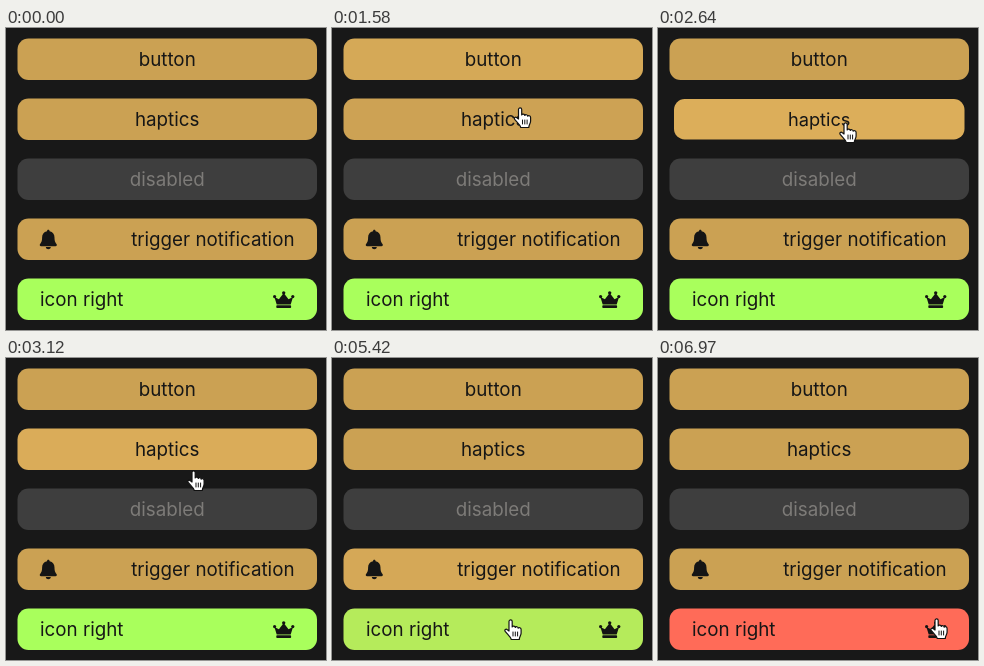
Recreate the animation shown at these times as an HTML page. Size 320 px wide and 302 px high, loop 7000 ms.

```html
<!DOCTYPE html>
<html lang="en">
<head>
<meta charset="utf-8">
<style>
  html, body { margin: 0; width: 100%; height: 100%; overflow: hidden; background: #181818; }
  svg { display: block; width: 320px; height: 302px; }
  text { font: 400 18.8px Inter, Roboto, sans-serif; fill: #161616; }
</style>
</head>
<body>
<svg id="stage" viewBox="0 0 320 302">
  <defs>
    <g id="bell" fill="#151515">
      <path d="M0-9.7C.9-9.7 1.3-9 1.3-8.2 4.6-7.5 6.2-5 6.2-2 6.2 2 7.2 3.1 8.2 4.4 9 5.4 8.4 6.6 7.2 6.6H-7.2C-8.4 6.6-9 5.4-8.2 4.4-7.2 3.1-6.2 2-6.2-2-6.2-5-4.6-7.5-1.3-8.2-1.3-9-.9-9.7 0-9.7Z"/>
      <path d="M-2.5 7.4H2.5C2.3 10.3-2.3 10.3-2.5 7.4Z"/>
    </g>
    <g id="crown" fill="#131313">
      <path d="M-9.3-2.6-4.8-.4 0-6.6 4.8-.4 9.3-2.6 7 4.9H-7Z"/>
      <rect x="-7.4" y="5.7" width="14.8" height="2.7" rx=".8"/>
      <circle cy="-6.7" r="1.7"/>
      <circle cx="-9.1" cy="-3" r="1.6"/>
      <circle cx="9.1" cy="-3" r="1.6"/>
    </g>
  </defs>
  <rect width="320" height="302" fill="#181818"/>
  <g id="buttons"></g>
  <g id="cursor">
    <g id="hand" transform="translate(-6.5 -1)" stroke="#111" stroke-linecap="round" stroke-linejoin="round">
      <path fill="#fff" stroke-width="1.2" d="M5 12V2.6C5 .4 8.2.4 8.2 2.6V8C8.4 6.7 11.2 6.8 11.3 8.4 11.8 7.3 14.1 7.6 14.2 9.1 14.9 8.2 17.1 8.5 17.1 10.5V14C17.1 16.5 15.3 17.5 15.3 20.5H7.2C6.8 18 3.5 15.5 1.2 12.4 0 10.6 2 9.6 3.4 10.8Z"/>
      <path fill="none" stroke-width="1" d="M9 13V17M11.3 13V17M13.6 13V17"/>
    </g>
    <path id="arrow" fill="#0c0c0c" stroke="#fff" stroke-width="1.3" stroke-linejoin="round" d="M0 0V16.5L3.9 12.9 6.6 19.2 9.6 17.9 6.9 11.8H12.2Z"/>
  </g>
</svg>
<script>
const LOOP = 7000;
const GOLD = [203, 161, 83], AMBER = [220, 174, 90];
const GREEN = [169, 255, 92], RED = [255, 107, 88], GRAY = [62, 62, 62];

// hover and press hold [start, end] times in ms
const specs = [
  { label: 'button', base: GOLD, over: AMBER, hover: [[500, 1460]], press: [[880, 1080]] },
  { label: 'haptics', base: GOLD, over: AMBER, hover: [[1550, 3080]], press: [[1920, 2100], [2450, 2860]] },
  { label: 'disabled', base: GRAY, over: GRAY, hover: [], press: [], color: '#7d7b78' },
  { label: 'trigger notification', base: GOLD, over: AMBER, hover: [[5130, 5290]], press: [],
    x: 288.5, anchor: 'end', icon: 'bell', iconX: 42.3 },
  { label: 'icon right', base: GREEN, over: RED, hover: [[5380, LOOP]], press: [[6000, 6200]],
    x: 34, anchor: 'start', icon: 'crown', iconX: 277.7 }
];

// pointer stops: time, x, y
const route = [
  [300, 330, 24], [760, 196, 31], [1330, 192, 33], [1580, 188, 80], [1860, 187.5, 95],
  [2900, 187.5, 95], [3120, 187.5, 113], [3550, 186, 148], [4980, 186, 148],
  [5420, 178.5, 262], [5700, 178.5, 265], [6250, 178.5, 265], [6800, 278.5, 261], [LOOP, 278.5, 261]
];

const $ = id => document.getElementById(id);
const clamp = v => Math.min(1, Math.max(0, v));
const ease = v => v * v * (3 - 2 * v);
const mix = (a, b, k) => a + (b - a) * k;

function add(parent, tag, attrs) {
  const node = document.createElementNS('http://www.w3.org/2000/svg', tag);
  for (const key in attrs) node.setAttribute(key, attrs[key]);
  return parent.appendChild(node);
}

const buttons = specs.map((spec, i) => {
  const y = 10.5 + 60 * i, cy = y + 20.75;
  const group = add($('buttons'), 'g', {});
  const rect = add(group, 'rect', { x: 11.5, y, width: 299.5, height: 41.5, rx: 11 });
  const text = add(group, 'text', { x: spec.x || 161.2, y: cy + 7, 'text-anchor': spec.anchor || 'middle' });
  text.textContent = spec.label;
  if (spec.color) text.style.fill = spec.color;
  if (spec.icon) add(group, 'use', { href: '#' + spec.icon, transform: `translate(${spec.iconX} ${cy + .3})` });
  return { ...spec, y, cy, group, rect };
});

// level of a state that fades in after start and out after end
function level(spans, t, fade) {
  return Math.max(0, ...spans.map(([start, end]) =>
    Math.min(clamp((t - start) / fade), 1 - clamp((t - end) / fade))));
}

function pointerAt(t) {
  const i = Math.max(1, route.findIndex(stop => stop[0] > t));
  const a = route[i - 1], b = route[i];
  const k = ease(clamp((t - a[0]) / (b[0] - a[0])));
  return [mix(a[1], b[1], k), mix(a[2], b[2], k)];
}

function draw(t) {
  for (const b of buttons) {
    const k = level(b.hover, t, 300);
    const s = 1 - .03 * ease(level(b.press, t, 150));
    b.rect.setAttribute('fill', `rgb(${b.base.map((c, i) => Math.round(mix(c, b.over[i], k)))})`);
    b.group.setAttribute('transform', `translate(161.25 ${b.cy}) scale(${s}) translate(-161.25 ${-b.cy})`);
  }
  const [x, y] = pointerAt(t);
  const onButton = x < 311 && buttons.some(b => b.base !== GRAY && y > b.y && y < b.y + 43.5);
  $('cursor').setAttribute('transform', `translate(${x} ${y})`);
  $('cursor').setAttribute('visibility', t < 300 ? 'hidden' : 'visible');
  $('hand').style.display = onButton ? '' : 'none';
  $('arrow').style.display = onButton ? 'none' : '';
}

const origin = performance.now();
function tick() {
  draw((performance.now() - origin) % LOOP);
  requestAnimationFrame(tick);
}
tick();
</script>
</body>
</html>
```
